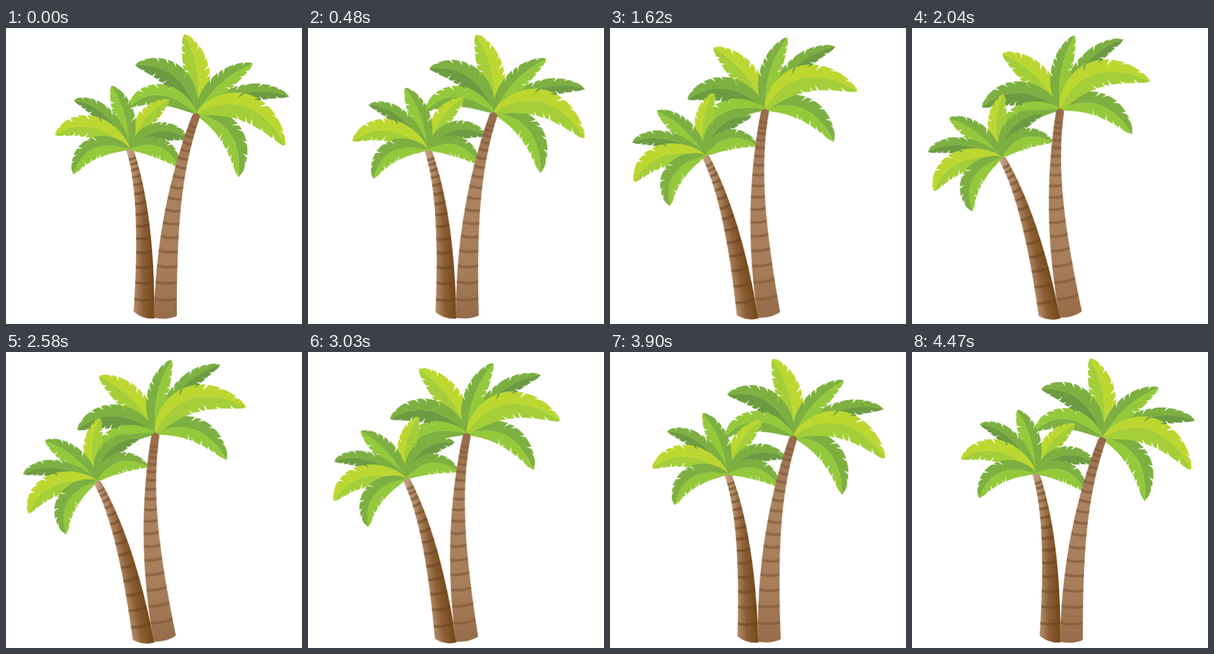
An HTML page that plays this animation: 480x480 px, repeating every 4500 ms.

```html
<!DOCTYPE html>
<html lang="en">
<head>
<meta charset="utf-8">
<title>Swaying palms</title>
<style>
html, body { margin: 0; width: 100%; height: 100%; overflow: hidden; background: #fff; }
svg { display: block; width: 100vw; height: 100vh; }
#palms, .crown {
  animation: sway 2250ms cubic-bezier(.3642, 0, .6358, 1) infinite alternate;
}
#palms { --turn: -12deg; transform-origin: 240px 471px; }
.crown { --turn: -26deg; }
#bigCrown { transform-origin: 309px 138px; }
#smallCrown { transform-origin: 200px 195px; }
@keyframes sway {
  from { transform: rotate(0deg); }
  to { transform: rotate(var(--turn)); }
}
.band { fill: none; stroke-width: 4.4; }
</style>
</head>
<body>
<svg viewBox="0 0 480 480">
  <defs>
    <linearGradient id="bigBark" x1="0" y1="0" x2="0" y2="1">
      <stop offset="0" stop-color="#966a48"/>
      <stop offset=".3" stop-color="#ab8360"/>
      <stop offset=".75" stop-color="#a77e5a"/>
      <stop offset="1" stop-color="#966b48"/>
    </linearGradient>
    <linearGradient id="smallBark">
      <stop offset="0" stop-color="#c9a58c"/>
      <stop offset=".27" stop-color="#b48d69"/>
      <stop offset=".6" stop-color="#8b5e35"/>
      <stop offset="1" stop-color="#744718"/>
    </linearGradient>
    <path id="bigShape" d="M240 470C242 365 259 255 302 141Q309 134 315 143C283 232 277 330 277 467Q262 474 240 470Z"/>
    <path id="smallShape" d="M207 460C213 370 215 260 195 198Q201 192 207 198C227 260 241 340 241 471Q222 473 207 460Z"/>
    <clipPath id="bigClip"><use href="#bigShape"/></clipPath>
    <clipPath id="smallClip"><use href="#smallShape"/></clipPath>
  </defs>
  <g id="palms">
    <g id="bigCrown" class="crown"></g>
    <use href="#smallShape" fill="url(#smallBark)"/>
    <g id="smallBands" clip-path="url(#smallClip)" stroke="#68401c" stroke-opacity=".5"></g>
    <g id="smallCrown" class="crown"></g>
    <use href="#bigShape" fill="url(#bigBark)"/>
    <g id="bigBands" clip-path="url(#bigClip)" stroke="#835a38" stroke-opacity=".65"></g>
  </g>
</svg>
<script>
const DARK = '#6c9b41', GREEN = '#7db041', FRESH = '#95c93c', SOFT = '#a4cf38', LIME = '#bdd731';

function addPath(parent, d, attrs) {
  const path = document.createElementNS('http://www.w3.org/2000/svg', 'path');
  path.setAttribute('d', d);
  for (const key in attrs) path.setAttribute(key, attrs[key]);
  document.getElementById(parent).append(path);
}

const quad = (a, b, c, s) => (1 - s) * (1 - s) * a + 2 * s * (1 - s) * b + s * s * c;

// One half of a leaf: along the midrib, then back along the torn outer edge.
function halfLeaf(root, bend, tip, width, side, seed) {
  const pointAt = (s, depth) => {
    const dx = (1 - s) * (bend[0] - root[0]) + s * (tip[0] - bend[0]);
    const dy = (1 - s) * (bend[1] - root[1]) + s * (tip[1] - bend[1]);
    const off = 1.16 * side * depth * width * Math.sin(Math.PI * s) ** 0.62 / Math.hypot(dx, dy);
    const x = quad(root[0], bend[0], tip[0], s) + dy * off;
    const y = quad(root[1], bend[1], tip[1], s) - dx * off;
    return x.toFixed(1) + ' ' + y.toFixed(1);
  };
  const edge = [];
  for (let i = 0; i < 20; i++) edge.push(pointAt(i / 50, 1));
  for (let k = 0; k < 5; k++) {
    const s = 0.43 + k * 0.115 + 0.022 * Math.sin(seed * 2.3 + k * 4.1);
    const cut = 0.64 + 0.14 * Math.sin(seed * 1.7 + k * 2.6);
    edge.push(pointAt(s, 1.02), pointAt(s - 0.03, cut),
      pointAt(s + 0.022, 0.98), pointAt(s + 0.05, 1), pointAt(s + 0.08, 1));
  }
  return `M${root}Q${bend} ${tip}L${edge.reverse().join('L')}Z`;
}

// Leaf: bend x, y, tip x, y, left width, right width, left colour, right colour.
function crown(id, root, leaves) {
  leaves.forEach(([bx, by, tx, ty, left, right, leftFill, rightFill], i) => {
    const bend = [bx, by], tip = [tx, ty];
    addPath(id, halfLeaf(root, bend, tip, left, 1, i + 1), { fill: leftFill });
    addPath(id, halfLeaf(root, bend, tip, right, -1, i + 9), { fill: rightFill });
    addPath(id, `M${root}Q${bend} ${tip}`, { fill: 'none', stroke: rightFill, 'stroke-width': 0.6 });
  });
}

// Bark rings follow the lean of the trunk and crowd together towards the top.
function bands(id, base, lean, power, height, half, crowd, count) {
  for (let k = 0; k < count; k++) {
    const y = 440 - 28 * k + crowd * k * k;
    const h = (470 - y) / height;
    const x = base + lean * h ** power;
    const tilt = lean * power * h ** (power - 1) / height;
    const w = half * (1 - 0.62 * h) + 3;
    addPath(id, `M${x - w} ${y - w * tilt - 1}Q${x} ${y + 4} ${x + w} ${y + w * tilt - 1}`, { class: 'band' });
  }
}

crown('bigCrown', [309, 139], [
  [322, 70, 289, 10, 19, 17, SOFT, LIME],
  [284, 55, 210, 60, 18, 16, DARK, GREEN],
  [392, 86, 459, 111, 12, 13, GREEN, DARK],
  [341, 82, 400, 58, 14, 15, GREEN, FRESH],
  [246, 83, 198, 129, 14, 15, GREEN, FRESH],
  [385, 154, 377, 242, 17, 16, GREEN, FRESH],
  [400, 92, 452, 191, 18, 20, LIME, SOFT]
]);
crown('smallCrown', [200, 196], [
  [220, 138, 265, 117, 12, 14, LIME, SOFT],
  [200, 136, 171, 94, 16, 13, FRESH, GREEN],
  [161, 122, 110, 117, 12, 11, DARK, GREEN],
  [246, 148, 297, 181, 13, 14, GREEN, DARK],
  [134, 136, 80, 174, 15, 16, SOFT, LIME],
  [130, 174, 109, 237, 15, 15, FRESH, GREEN],
  [254, 174, 281, 226, 13, 16, GREEN, FRESH]
]);
bands('bigBands', 258.5, 50, 2.5, 328, 18.5, 0.65, 17);
bands('smallBands', 224.5, -24, 3, 271, 16, 0.8, 14);
</script>
</body>
</html>
```
